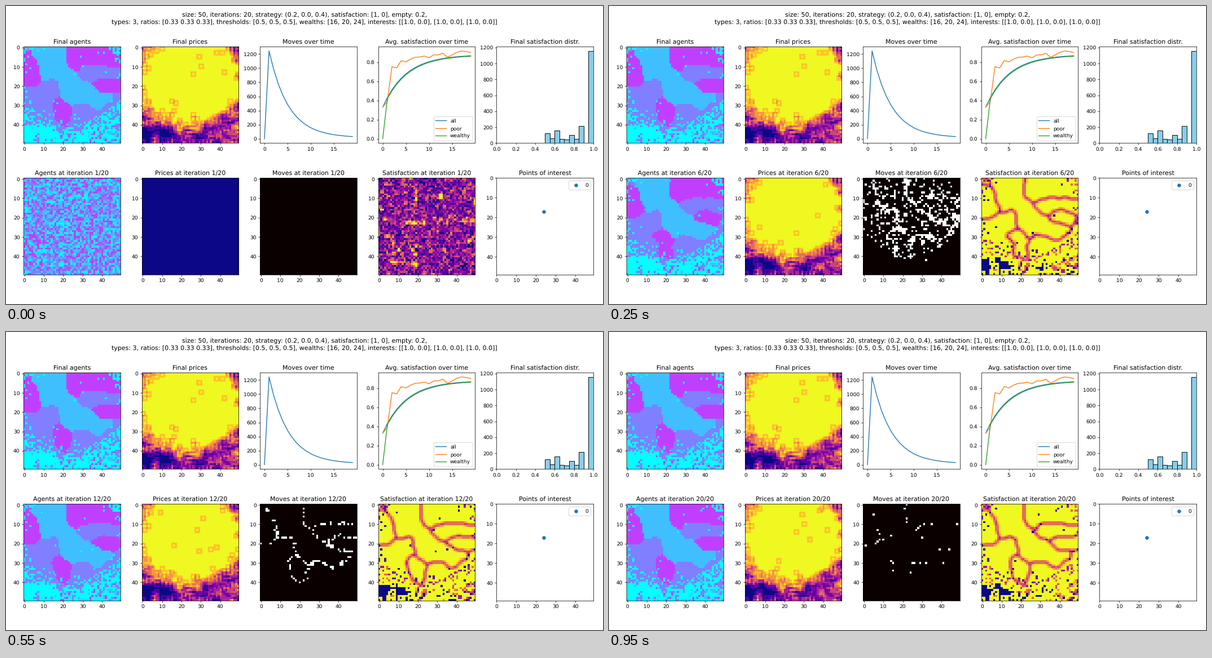
A matplotlib script that plays this animation: 1058x529 px, repeating every 1000 ms.

```python
import numpy as np
import matplotlib.pyplot as plt
from matplotlib.animation import FuncAnimation

W, H, DPI = 1058, 529, 66.125
N, STEPS = 50, 20
POI = (24, 17)

# Points around which each agent type gathers.
SEEDS = [
    [(12, 12), (13, 4), (22, 17), (22, 25), (31, 24), (40, 28)],
    [(16, 21), (4, 28), (10, 34), (32, 13), (30, 33), (41, 13), (45, 31)],
    [(4, 13), (29, 7), (43, 6), (40, 19), (19, 31), (36, 5)],
]
VOIDS = [(1.5, 45), (11.5, 44.5)]

rng = np.random.default_rng(50)
yy, xx = np.mgrid[:N, :N]
dist = np.hypot(.92 * (xx - POI[0]), 1.05 * (yy - POI[1]))
far = np.clip(dist - 24, 0, 8)

t = np.arange(STEPS)
moves = np.where(t > 0, 1230 * np.exp(-.24 * (t - 1)) + 15, 0).astype(int)
avg_all = .878 - .548 * np.exp(-.2 * t)
avg_wealthy = np.where(t > 0, avg_all - .012 * np.exp(-.05 * t), 0)
avg_poor = np.where(t > 1, .94 - .2 * np.exp(-.13 * (t - 2))
                    + rng.normal(0, .018, STEPS), .33 + .06 * t)


def around(a):
    """Sum over the eight neighbours."""
    p = np.pad(a.astype(float), 1)
    return sum(p[i:i + N, j:j + N] for i in range(3) for j in range(3)) - a


def near(points, size):
    return sum(np.exp(-((xx - x) ** 2 + (yy - y) ** 2) / (2 * size ** 2))
               for x, y in points)


def top_cells(score, count):
    chosen = np.zeros(N * N, bool)
    chosen[np.argsort(score.ravel())[N * N - count:]] = True
    return chosen.reshape(N, N)


neighbours = around(np.ones((N, N)))
pull = np.array([near(pts, 3.5) for pts in SEEDS])
pull /= pull.sum(axis=0) + .1
start = rng.normal(28, 4, (N, N))
settled = np.minimum(dist, 29) + rng.normal(0, 4, (N, N)) + 14 * near(VOIDS, 1.8)
settled[dist < 20] -= 8
pool = [(x, y) for x, y in rng.integers(1, 46, (120, 2)) if dist[y, x] < 22]


def empty_at(k):
    """A fifth of the cells; they drift away from the point of interest."""
    mix = min((k - 1) * .4, 1)
    score = (1 - mix) * start + mix * settled + rng.normal(0, .6, (N, N))
    if k > 3:
        for x, y in pool[k:k + 3 + k // 3]:
            score[y, x] = 99
    return top_cells(score, N * N // 5)


def prices_of(grid):
    return around(grid > 0) / neighbours


def satisfaction_of(grid):
    taken = around(grid > 0)
    same = np.choose(grid, [neighbours - taken] + [around(grid == c) for c in (1, 2, 3)])
    return np.minimum(same / np.maximum(taken, 1), 1) * (taken > 0)


def simulate():
    """Each step the least content agents take on the type that fits there."""
    types = rng.integers(1, 4, (N, N))
    grid = np.where(empty_at(1), 0, types)
    blank = np.zeros((N, N))
    states = [(grid, blank, blank, satisfaction_of(grid))]
    for k in range(2, STEPS + 1):
        empty = empty_at(k)
        grid = np.where(empty, 0, types)
        score = .8 * rng.random((N, N)) - satisfaction_of(grid) - 9 * empty
        score += far * (.15 if k < 4 else -.25)
        moved = top_cells(score, moves[k - 1])
        fit = [around(grid == c + 1) + 5 * pull[c] + rng.random((N, N))
               for c in range(3)]
        types = np.where(moved | empty, np.argmax(fit, axis=0) + 1, types)
        grid = np.where(empty, 0, types)
        states.append((grid, prices_of(grid), moved, satisfaction_of(grid)))
    return states, np.where(empty_at(STEPS + 1), 0, types)


states, final = simulate()

plt.rcParams["text.hinting"] = "no_hinting"
fig = plt.figure(figsize=(W / DPI, H / DPI), dpi=DPI, facecolor="white")
fig.suptitle(
    "size: 50, iterations: 20, strategy: (0.2, 0.0, 0.4), "
    "satisfaction: [1, 0], empty: 0.2,\n"
    "types: 3, ratios: [0.33 0.33 0.33], thresholds: [0.5, 0.5, 0.5], "
    "wealths: [16, 20, 24], interests: [[1.0, 0.0], [1.0, 0.0], [1.0, 0.0]]",
    fontsize=12, linespacing=1.3)


def panel(row, col, title=""):
    left, top = 31 + 209.6 * col, (72, 305.4)[row]
    ax = fig.add_axes([left / W, 1 - (top + 171.4) / H, 171.5 / W, 171.4 / H])
    ax.set_title(title)
    return ax


def grid_ticks(ax):
    ax.set_xticks(range(0, N, 10))
    ax.set_yticks(range(0, N, 10))


def heat(ax, data, cmap, top=1):
    im = ax.imshow(data, cmap=cmap, vmin=0, vmax=top,
                   interpolation="nearest", aspect="auto")
    grid_ticks(ax)
    return im


heat(panel(0, 0, "Final agents"), final, "cool", 4)
heat(panel(0, 1, "Final prices"), prices_of(final), "plasma")

ax = panel(0, 2, "Moves over time")
ax.plot(moves)
ax.set_xticks(range(0, STEPS, 5))
ax.set_yticks(range(0, 1201, 200))

ax = panel(0, 3, "Avg. satisfaction over time")
for name, series in (("all", avg_all), ("poor", avg_poor), ("wealthy", avg_wealthy)):
    ax.plot(series, label=name)
ax.set_xticks(range(0, STEPS, 5))
ax.set_yticks([0, .2, .4, .6, .8])
ax.legend(loc="lower right")

ax = panel(0, 4, "Final satisfaction distr.")
bars = np.zeros(20)
bars[[0, 2, 5, 7]] = 6
bars[10:] = 125, 62, 155, 50, 42, 100, 50, 212, 0, 1155
ax.bar(np.arange(20) / 20, bars, width=.05, align="edge",
       color="skyblue", edgecolor="black")
ax.set_xlim(0, 1)
ax.set_yticks(range(0, 1201, 200))

ax = panel(1, 4, "Points of interest")
ax.scatter(*POI, label="0")
ax.set_xlim(0, N - 1)
ax.set_ylim(N - 1, 0)
grid_ticks(ax)
ax.legend(loc="upper right")

names = ("Agents", "Prices", "Moves", "Satisfaction")
axes = [panel(1, col) for col in range(4)]
images = [heat(ax, data, cmap, top) for ax, data, cmap, top in
          zip(axes, states[0], ("cool", "plasma", "hot", "plasma"), (4, 1, 1, 1))]


def update(i):
    for ax, im, name, data in zip(axes, images, names, states[i]):
        im.set_data(data.astype(float))
        ax.set_title(f"{name} at iteration {i + 1}/{STEPS}")
    return images


anim = FuncAnimation(fig, update, frames=STEPS, interval=50,
                     repeat=True, repeat_delay=0, blit=False)
plt.show()
```
